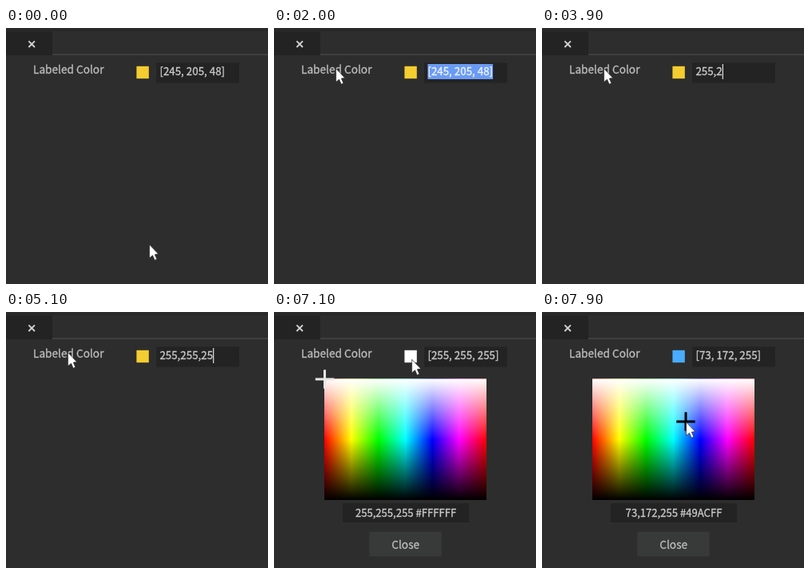
An HTML page for the animation above (8 s loop, 328 by 320 pixels).

```html
<!DOCTYPE html>
<html lang="en">
<head>
<meta charset="utf-8">
<title>Labeled Color</title>
<style>
  html, body { margin: 0; width: 100%; height: 100%; overflow: hidden; background: #2d2d2d; }
  svg { display: block; width: 100vw; height: 100vh; }
  text { font-family: "Noto Sans CJK SC", "Noto Sans CJK JP", "Noto Sans CJK", "Noto Sans", sans-serif; font-size: 13.35px; fill: #cbcbcb; stroke: #cbcbcb; stroke-width: .3; white-space: pre; }
  .label { font-size: 13.65px; fill: #bebebe; stroke: #bebebe; }
  .selected { fill: #f0f4ff; stroke: #f0f4ff; }
  .well { fill: #232323; }
</style>
</head>
<body>
<svg viewBox="0 0 328 320">
  <defs>
    <linearGradient id="hue">
      <stop offset="0" stop-color="#f00"/>
      <stop offset=".16667" stop-color="#ff0"/>
      <stop offset=".33333" stop-color="#0f0"/>
      <stop offset=".5" stop-color="#0ff"/>
      <stop offset=".66667" stop-color="#00f"/>
      <stop offset=".83333" stop-color="#f0f"/>
      <stop offset="1" stop-color="#f00"/>
    </linearGradient>
    <linearGradient id="shade" x2="0" y2="1">
      <stop offset="0" stop-color="#fff"/>
      <stop offset=".5" stop-color="#fff" stop-opacity="0"/>
      <stop offset=".5" stop-color="#000" stop-opacity="0"/>
      <stop offset="1" stop-color="#000"/>
    </linearGradient>
  </defs>
  <rect width="328" height="320" fill="#2d2d2d"/>
  <rect y="1.5" width="328" height="2" fill="#272727"/>
  <rect class="well" y="4.5" width="58" height="29.5"/>
  <rect x="58" y="32.5" width="270" height="1.3" fill="#494949"/>
  <path d="M28.4 16.4l7.6 7.6m0-7.6l-7.6 7.6" stroke="#d2d2d2" stroke-width="1.9"/>

  <text class="label" x="34" y="57">Labeled Color</text>
  <rect id="swatch" x="163.4" y="47.8" width="15.4" height="15.4"/>
  <rect class="well" x="188" y="43.5" width="104" height="25"/>
  <rect id="selection" y="45" height="19" fill="#6a9bf4"/>
  <text id="value" x="192.4" y="59.3"></text>
  <rect id="caret" y="45" width="1.2" height="19" fill="#e0e0e0"/>

  <g id="picker">
    <rect x="63" y="83.5" width="203" height="151.5" fill="url(#hue)"/>
    <rect x="63" y="83.5" width="203" height="151.5" fill="url(#shade)"/>
    <path id="cross" d="M-11.7 0H11.7M0-11.7V11.7" stroke-width="3"/>
    <rect class="well" x="86" y="239" width="158" height="24"/>
    <text id="code" x="165" y="255.7" text-anchor="middle" style="font-size:13.1px"></text>
    <rect x="119.2" y="274.7" width="90.6" height="30.8" fill="#383939"/>
    <text class="label" x="164.7" y="295.8" text-anchor="middle">Close</text>
  </g>
  <path id="cursor" d="M.6 .8V17.6L4.5 14.2L7.2 20.3L9.9 19.1L7.3 13.1L11.8 12.6Z" fill="#fff" stroke="#2a2a2a" stroke-width=".7"/>
</svg>
<script>
const LOOP = 8000, STEP = 100, TEXT_X = 192.4;
const $ = id => document.getElementById(id);

// Pointer path: time, x, y
const path = [
  [0, 179, 270], [300, 95, 130], [500, 43, 52], [900, 291, 53],
  [1000, 291, 53], [1400, 205, 40], [1800, 101, 48], [2000, 77, 50],
  [5900, 77, 50], [6100, 122, 112], [6200, 158, 127], [6300, 174, 88],
  [6500, 174, 68], [6800, 172, 58.5], [7100, 172, 58.5], [7500, 190, 189],
  [7800, 180, 137]
];
const typed = "255,255,255";
const keys = [2700, 3000, 3300, 3600, 3800, 4000, 4200, 4500, 4700, 4900, 5200];
const SELECT = 1000, CLEAR = 2400, COMMIT = 5400, OPEN = 7100, PICK = 7800;

function pointer(t) {
  const i = path.findIndex(p => p[0] > t);
  if (i < 0) return path[path.length - 1].slice(1);
  const [t0, x0, y0] = path[i - 1], [t1, x1, y1] = path[i];
  const k = (t - t0) / (t1 - t0);
  return [x0 + (x1 - x0) * k, y0 + (y1 - y0) * k];
}

function colorAt(t) {
  return t < COMMIT ? [245, 205, 48] : t < PICK ? [255, 255, 255] : [73, 172, 255];
}

const hex = rgb => "#" + rgb.map(v => v.toString(16).padStart(2, "0")).join("").toUpperCase();

function set(id, attrs) {
  for (const name in attrs) $(id).setAttribute(name, attrs[name]);
}

function show(id, on) {
  $(id).style.display = on ? "" : "none";
}

function draw(t) {
  const [x, y] = pointer(t), rgb = colorAt(t);
  const typing = t >= CLEAR && t < COMMIT;
  const value = $("value");
  value.textContent = typing ? typed.slice(0, keys.filter(k => k <= t).length) : `[${rgb.join(", ")}]`;
  const end = TEXT_X + (value.textContent ? value.getComputedTextLength() : 0);

  const from = t < 2000 ? Math.max(TEXT_X, Math.min(end, x)) : TEXT_X;
  const selecting = t >= SELECT && t < CLEAR && from < end;
  show("selection", selecting);
  set("selection", { x: from, width: Math.max(0, end - from) });
  value.classList.toggle("selected", selecting);

  show("caret", typing);
  set("caret", { x: end });
  set("swatch", { fill: hex(rgb) });

  show("picker", t >= OPEN);
  const picked = t >= PICK;
  set("cross", {
    transform: picked ? "translate(180 137)" : "translate(63.5 84)",
    stroke: picked ? "#000" : "#e6e6e6"
  });
  $("code").textContent = `${rgb} ${hex(rgb)}`;
  set("cursor", { transform: `translate(${x} ${y})` });
}

const start = performance.now();
function tick() {
  const t = (performance.now() - start) % LOOP;
  draw(Math.floor(t / STEP) * STEP);
  requestAnimationFrame(tick);
}
tick();
</script>
</body>
</html>
```
